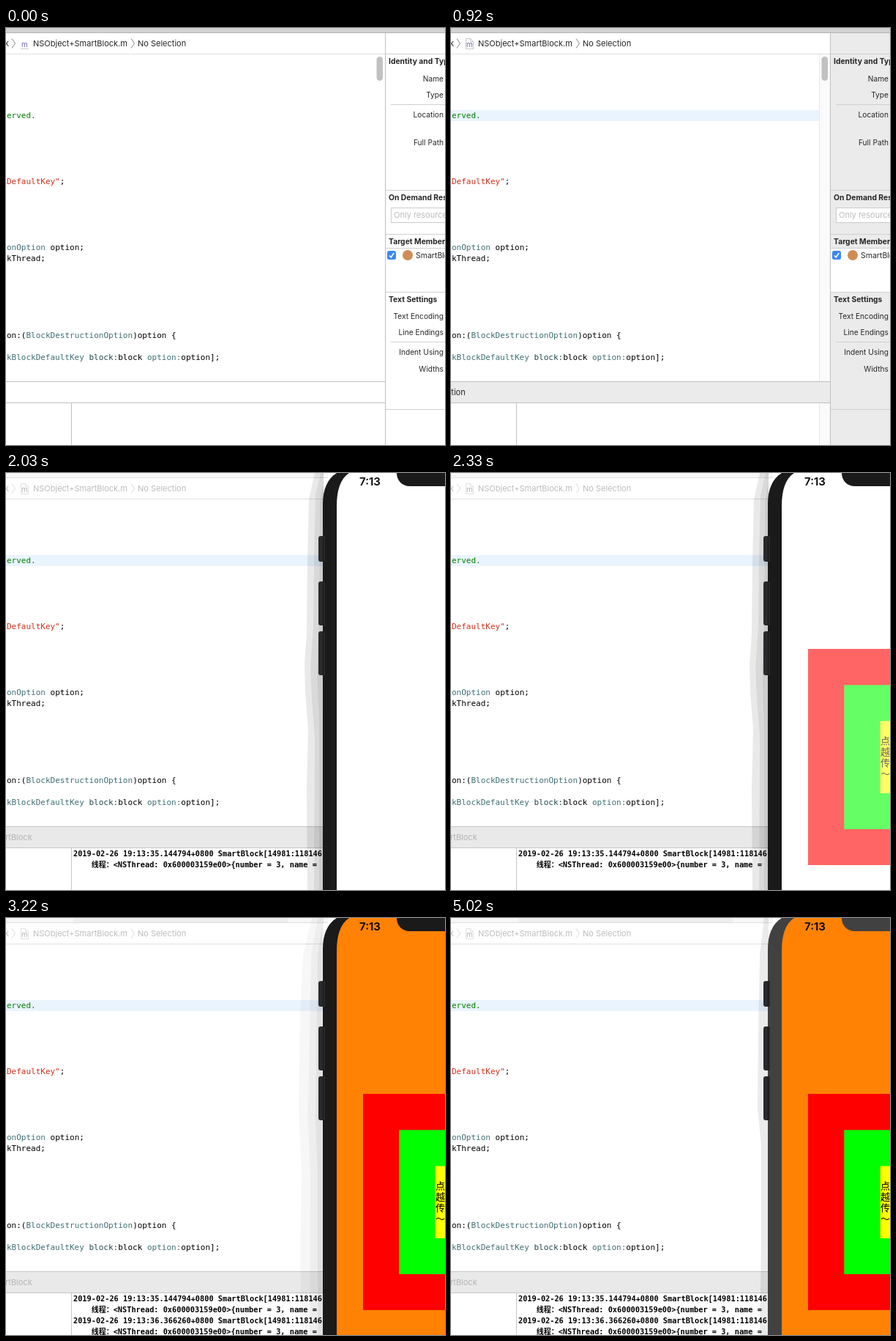
These frames come from a looping animation (600 by 569 pixels, 5120 ms). An HTML page:

```html
<!DOCTYPE html>
<html lang="zh-CN">
<head>
<meta charset="utf-8">
<title>Block demo</title>
<style>
  html, body { margin: 0; width: 100%; height: 100%; overflow: hidden; background: #fff; }
  svg { display: block; width: 600px; height: 569px; }
  text { font: 11px Inter, sans-serif; fill: #262626; white-space: pre; }
  .code text { font: 11px "DejaVu Sans Mono", monospace; fill: #000; }
  .code .type { fill: #3f6e74; }
  .code .call { fill: #26474b; }
  .code .comment { fill: #008000; }
  .code .string { fill: #d12f1b; }
  .console text { font: bold 10.27px "DejaVu Sans Mono", monospace; fill: #000; }
  .console .cjk { font: bold 10px "Noto Sans CJK SC", "Noto Sans CJK", sans-serif; }
  .head text { font-size: 10.35px; font-weight: 700; }
  .label text { font-size: 10.2px; text-anchor: end; }
  .title text { font: 13px "Noto Sans CJK SC", "Noto Sans CJK", sans-serif; fill: #000; }
  .clock { font-size: 15px; font-weight: 600; fill: #000; }
  .dim text { fill: #b4b4b4; }

  /* Hard cuts on one shared 5.12 s clock */
  .cut { animation: 5.12s step-end infinite; }
  .front { animation-name: front; }
  .lit { animation-name: lit; }
  .focus { animation-name: focus; }
  .sim { animation-name: sim; }
  .log1 { animation-name: log1; }
  .squares { animation-name: squares; }
  .log2 { animation-name: log2; }
  .shade1 { animation-name: shade1; }
  .shade2 { animation-name: shade2; }
  .shade3 { animation-name: shade3; }
  .body { animation-name: body; }
  .screen { animation-name: screen; }
  @keyframes front { 0% { opacity: 1 } 20.8984%, to { opacity: 0 } }
  @keyframes lit { 0% { opacity: 0 } 11.7188%, to { opacity: 1 } }
  @keyframes focus { 0% { opacity: 0 } 11.7188%, to { opacity: 1 } }
  @keyframes sim { 0% { opacity: 0 } 20.8984%, to { opacity: 1 } }
  @keyframes log1 { 0% { opacity: 0 } 39.6484%, to { opacity: 1 } }
  @keyframes squares { 0% { opacity: 0 } 45.5078% { opacity: .6 } 48.4375%, to { opacity: 1 } }
  @keyframes log2 { 0% { opacity: 0 } 62.8906%, to { opacity: 1 } }
  @keyframes shade1 { 0% { opacity: 1 } 62.8906%, to { opacity: 0 } }
  @keyframes shade2 { 0% { opacity: 0 } 62.8906% { opacity: 1 } 98.0469%, to { opacity: 0 } }
  @keyframes shade3 { 0% { opacity: 0 } 98.0469%, to { opacity: 1 } }
  @keyframes body { 0% { fill: #1a1a1a } 98.0469%, to { fill: #414141 } }
  @keyframes screen { 0% { fill: #fff } 62.8906%, to { fill: #ff8205 } }
</style>
</head>
<body>
<svg viewBox="0 0 600 569">
  <defs>
    <g id="path-bar">
      <path d="M8 14.500l4.500 6.500l-4.500 6.500M171 14.500l4.500 6.500l-4.500 6.500" fill="none" stroke="#858585"/>
      <text x="-2" y="25">k</text>
      <text x="37" y="25">NSObject+SmartBlock.m</text>
      <text x="180" y="25">No Selection</text>
    </g>
    <g id="file-icon">
      <path d="M20.500 14.500h6l4 4v10h-10z" fill="#fff" stroke="#c6c6c6"/>
      <path d="M26.500 14.500v4h4" fill="none" stroke="#c6c6c6"/>
    </g>
  </defs>

  <rect width="600" height="569" fill="#fff"/>
  <rect class="cut focus" y="112" width="503" height="15" fill="#eaf4ff"/>

  <g class="code">
    <text class="comment" x="-5.700" y="123">served.</text>
    <text x="-5.700" y="213"><tspan class="string">kDefaultKey"</tspan>;</text>
    <text x="-5.700" y="303"><tspan class="type">ionOption</tspan> option;</text>
    <text x="-5.700" y="318">ckThread;</text>
    <text x="-5.700" y="423">ion:(<tspan class="type">BlockDestructionOption</tspan>)option {</text>
    <text x="0.900" y="453"><tspan class="type">kBlockDefaultKey</tspan> <tspan class="call">block:</tspan>block <tspan class="type">option:</tspan>option];</text>
  </g>

  <g class="cut front">
    <rect width="600" height="6" fill="#d2d2d2"/>
    <rect y="6" width="600" height="1" fill="#b4b4b4"/>
    <rect x="519" y="7" width="81" height="562" fill="#fff"/>
    <g class="cut lit">
      <rect x="503" y="36" width="15" height="533" fill="#fafafa"/>
      <path d="M503.500 36V569" stroke="#e8e8e8"/>
      <path d="M519 7h81v294h-81zM519 360h81v209h-81zM0 483h518v28H0z" fill="#ebebeb"/>
      <rect x="526" y="245" width="80" height="21" fill="#fff"/>
      <use href="#file-icon"/>
      <text x="-6" y="501">ction</text>
    </g>
    <path d="M0 35.500H518" stroke="#e0e0e0"/>
    <path d="M518.500 7V569M0 482.500H518M0 511.500H518M89.500 512V569" stroke="#c0c0c0"/>
    <path d="M519 35.500h81M526 104.500h74M519 221.500h81M519 281.500h81M519 300.500h81M519 360.500h81M526 428.500h74M519 520.500h81" stroke="#d0d0d0"/>
    <rect x="526.500" y="245.500" width="80" height="20" fill="none" stroke="#cbcbcb"/>
    <rect x="506.500" y="39" width="8.500" height="33" rx="4.200" fill="#c1c1c1"/>
    <use href="#path-bar"/>
    <text x="21" y="26" style="font-size:10px;fill:#7068b0">m</text>
    <path d="M20 28.500h11" stroke="#c9c9cf"/>
    <g class="head">
      <text x="523" y="49">Identity and Type</text>
      <text x="523" y="235">On Demand Resource Tags</text>
      <text x="523" y="295">Target Membership</text>
      <text x="523" y="374">Text Settings</text>
    </g>
    <g class="label">
      <text x="598" y="73">Name</text>
      <text x="598" y="95">Type</text>
      <text x="598" y="122">Location</text>
      <text x="598" y="160">Full Path</text>
      <text x="598" y="397">Text Encoding</text>
      <text x="598" y="419">Line Endings</text>
      <text x="598" y="446">Indent Using</text>
      <text x="598" y="469">Widths</text>
    </g>
    <text x="530" y="259" style="fill:#bcbcbc">Only resources</text>
    <rect x="521" y="304" width="12" height="12" rx="2.500" fill="#3b87f7"/>
    <path d="M524 310.500l2.200 2.500l4-6" fill="none" stroke="#fff" stroke-width="1.600"/>
    <circle cx="549" cy="310" r="7" fill="#cf8d55"/>
    <text x="560" y="314" style="font-size:10.500px">SmartBlock</text>
  </g>

  <g class="cut sim">
    <rect width="440" height="6" fill="#f6f6f6"/>
    <rect class="cut log2" x="92" width="293" height="6" fill="#eeeeee"/>
    <rect y="483" width="440" height="28" fill="#e9e9e9"/>
    <path d="M0 6.500H440M0 35.500H440" stroke="#e0e0e0"/>
    <path d="M0 482.500H440M0 511.500H440M89.500 512V569" stroke="#c6c6c6"/>
    <g class="dim">
      <use href="#path-bar" opacity=".3"/>
      <use href="#file-icon" opacity=".5"/>
      <text x="21" y="26" style="font-size:10px">m</text>
      <text x="-1" y="501">rtBlock</text>
    </g>

    <g class="console">
      <g class="cut log1">
        <text x="92" y="523">2019-02-26 19:13:35.144794+0800 SmartBlock[14981:118146</text>
        <text x="116.700" y="538"><tspan class="cjk">线程：</tspan>&lt;NSThread: 0x600003159e00>{number = 3, name = (</text>
      </g>
      <g class="cut log2">
        <text x="92" y="553">2019-02-26 19:13:36.366260+0800 SmartBlock[14981:118146</text>
        <text x="116.700" y="568"><tspan class="cjk">线程：</tspan>&lt;NSThread: 0x600003159e00>{number = 3, name = (</text>
      </g>
    </g>

    <g class="cut shade1">
      <path d="M422 0L414 36L412 120L411 220L408 260L409 300L413 350L411 430L412 569H434V0Z" fill-opacity=".085"/>
      <path d="M430 0L423 30L421 110L420 210L416 265L418 310L422 360L421 569H434V0Z" fill-opacity=".065"/>
      <path d="M434 10L429 40L428 200L425 270L428 340L428 569H434Z" fill-opacity=".06"/>
    </g>
    <g class="cut shade2">
      <path d="M418 0L406 50L402 130L400 260L404 350L402 460L404 569H434V0Z" fill-opacity=".03"/>
      <path d="M426 0L417 50L414 200L412 270L416 350L415 569H434V0Z" fill-opacity=".035"/>
      <path d="M432 10L426 50L424 200L423 280L426 350L426 569H434Z" fill-opacity=".05"/>
    </g>
    <g class="cut shade3">
      <path d="M428 0L422 50L420 160L419 260L424 310L424 440L422 569H434V0Z" fill-opacity=".08"/>
    </g>

    <path class="cut body" d="M433 569V42C433 23 439 8 452 0H600V569Z"/>
    <path class="cut screen" d="M452 569V46C452 23 457 8 469 0H534C534 10 541 18 552 18H600V569Z"/>
    <path d="M436 86h-6q-3 0-3 3v29q0 3 3 3h6zM436 148h-6q-3 0-3 3v54q0 3 3 3h6zM436 216h-6q-3 0-3 3v54q0 3 3 3h6z" fill="#292a2c"/>
    <path d="M433.500 86v35M433.500 148v60M433.500 216v60" stroke="#151515"/>
    <text class="clock" x="483" y="17">7:13</text>

    <g class="cut squares">
      <rect x="488" y="240" width="112" height="295" fill="#f00"/>
      <rect x="537.300" y="289.300" width="63" height="196.700" fill="#0f0"/>
      <rect x="586.600" y="338.500" width="14" height="98.500" fill="#ff0"/>
      <g class="title">
        <text x="587" y="370">点</text>
        <text x="587" y="385">越</text>
        <text x="587" y="400">传</text>
        <text x="587" y="415">～</text>
      </g>
    </g>
  </g>
</svg>
</body>
</html>
```
